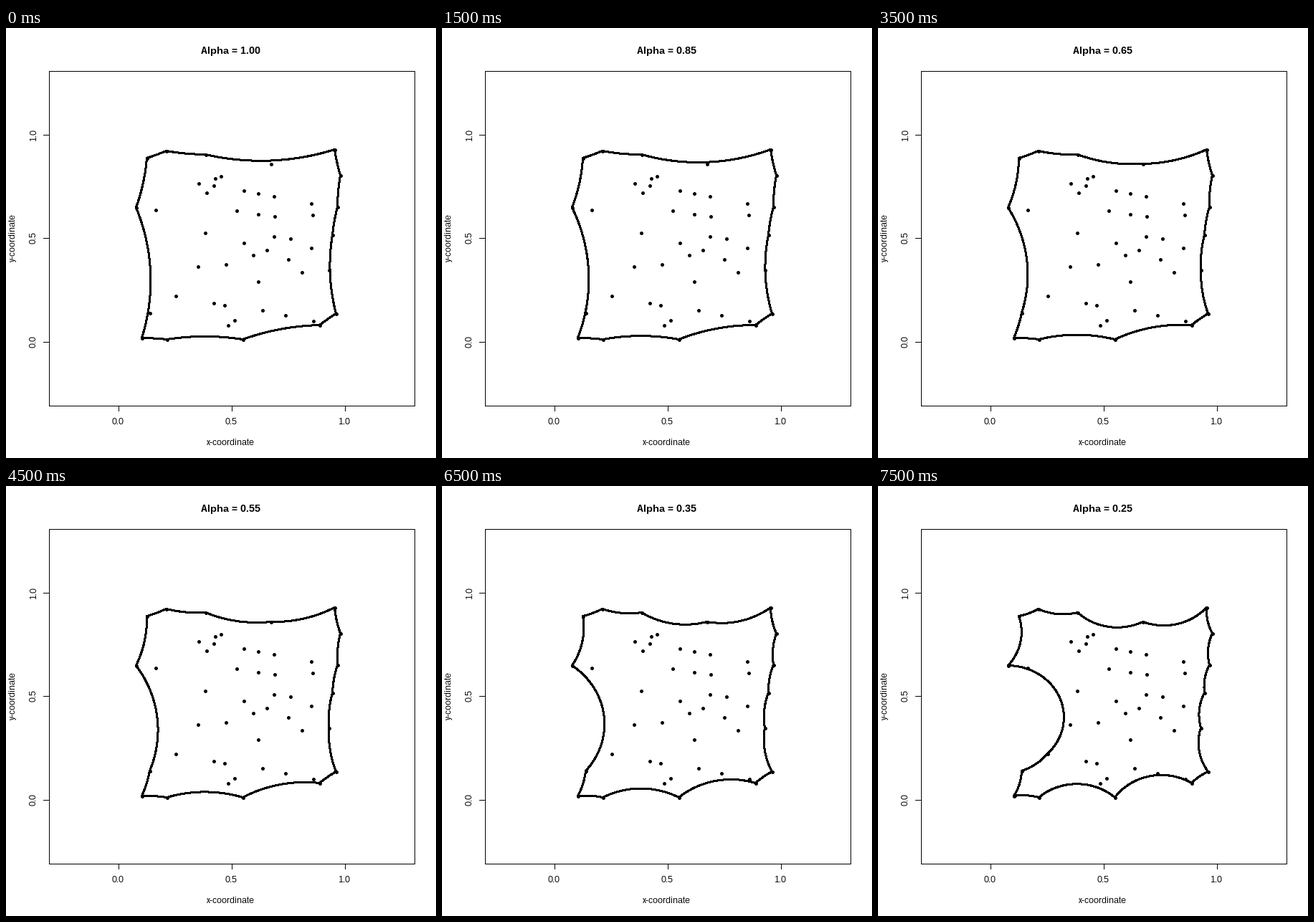
A matplotlib script that plays this animation: 600x600 px, repeating every 8000 ms.

```python
import matplotlib.pyplot as plt
import numpy as np
from matplotlib.animation import FuncAnimation

PX = 0.72  # points per pixel at 100 dpi
STEPS = 16

plt.rcParams.update({
    "font.family": "Liberation Sans",
    "text.hinting": "native",
    "text.hinting_factor": 1,
})

# Plot region in pixels and the scale of its data coordinates
ORIGIN = np.array([156.77, 437.09])
SCALE = np.array([315.26, -288.6])

# Pixel positions of the sample points
DOTS = np.array([
    (196, 181), (223, 171), (278, 176), (458, 169), (466, 205), (462, 249),
    (455, 288), (450, 337), (460, 398), (437, 414), (330, 434), (224, 434),
    (189, 432), (200, 397), (181, 250), (369, 189), (268, 216), (289, 219),
    (291, 209), (299, 206), (279, 229), (331, 226), (351, 230), (373, 234),
    (321, 254), (351, 259), (374, 262), (425, 244), (427, 260), (208, 253),
    (277, 285), (331, 299), (344, 316), (363, 309), (373, 290), (396, 293),
    (425, 306), (393, 322), (412, 340), (267, 332), (306, 329), (351, 353),
    (236, 373), (289, 383), (304, 386), (309, 414), (318, 407), (357, 393),
    (389, 400), (428, 408),
]) + 0.5
POINTS = (DOTS - ORIGIN) / SCALE


def arc(center, radius, a, b):
    """Pixel path of the shorter arc from a to b."""
    t0 = np.arctan2(*(a - center)[::-1])
    t1 = np.arctan2(*(b - center)[::-1])
    sweep = (t1 - t0 + np.pi) % (2 * np.pi) - np.pi
    t = t0 + sweep * np.linspace(0, 1, 60)
    path = center + radius * np.column_stack([np.cos(t), np.sin(t)])
    return path * SCALE + ORIGIN


def alpha_hull(radius):
    """Arcs of all empty discs of this radius that touch two points."""
    paths = []
    for i, a in enumerate(POINTS):
        for j, b in enumerate(POINTS):
            chord = b - a
            length = np.hypot(*chord)
            if i == j or length > 2 * radius:
                continue
            normal = np.array([-chord[1], chord[0]]) / length
            center = (a + b) / 2 + normal * np.sqrt(radius**2 - length**2 / 4)
            gap = np.hypot(*(POINTS - center).T)
            if gap.min() > radius - 1e-7:
                paths += [arc(center, radius, a, b), [[np.nan, np.nan]]]
    return np.vstack(paths).T


fig = plt.figure(figsize=(6, 6), dpi=100, facecolor="white")
ax = fig.add_axes([0, 0, 1, 1])
ax.set(xlim=(0, 600), ylim=(600, 0))
ax.axis("off")


def line(x, y, width=1, **style):
    return ax.plot(x, y, color="black", lw=width * PX, antialiased=False,
                   **style)[0]


def label(x, y, text, size=12, **style):
    return ax.text(x, y, text, fontsize=size * PX, ha="center",
                   va="baseline", **style)


def side_label(x, y, text):
    ax.text(x, y, text, fontsize=12 * PX, rotation=90, rotation_mode="anchor",
            ha="center", va="baseline")


line([59.5, 569.5, 569.5, 59.5, 59.5], [59.5, 59.5, 526.5, 526.5, 59.5],
     solid_joinstyle="miter")
for value, x, y in [(0, 156, 437), (0.5, 314, 292), (1, 472, 148)]:
    line([x + 0.5] * 2, [526.5, 534], solid_capstyle="butt")
    line([51.5, 59.5], [y + 0.5] * 2, solid_capstyle="butt")
    label(x, 553, f"{value:.1f}")
    side_label(42, y + 0.5, f"{value:.1f}")
label(313.5, 582, "x-coordinate")
side_label(13, 292, "y-coordinate")

title = label(313.5, 36, "", 14, weight="bold")
hull = line([], [], 2, solid_joinstyle="round")
line(*DOTS.T, 0, ls="none", marker="o", ms=5 * PX, mew=0)


def update(step):
    alpha = 1 - 0.05 * step
    title.set_text(f"Alpha = {alpha:.2f}")
    hull.set_data(*alpha_hull(alpha))
    return title, hull


anim = FuncAnimation(fig, update, frames=STEPS, interval=500, repeat=True,
                     repeat_delay=0)
plt.show()
```
